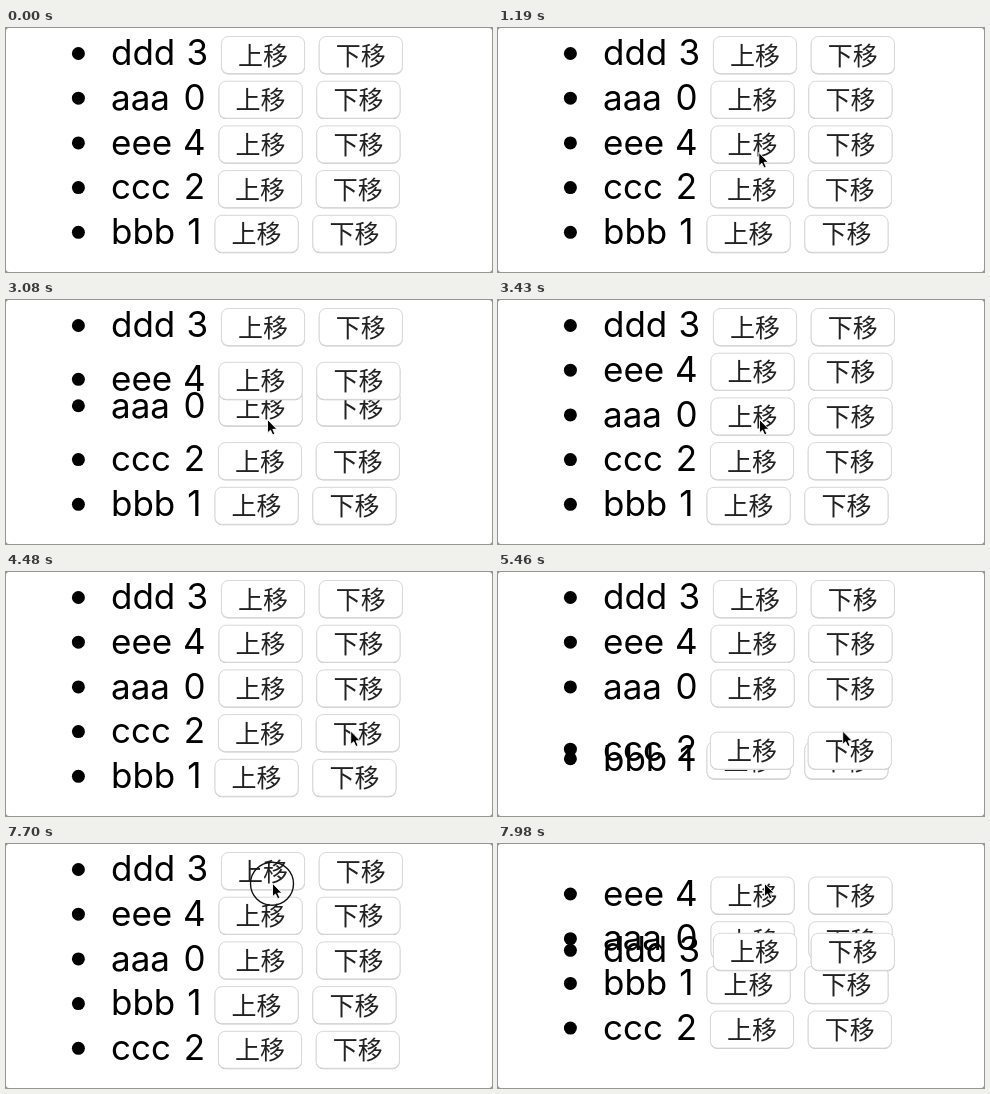
An HTML page that plays this animation: 486 px wide and 244 px high, repeating every 8 s.

```html
<!DOCTYPE html>
<html lang="zh-CN">
<head>
<meta charset="utf-8">
<title>List reorder</title>
<style>
  html, body { margin: 0; width: 100%; height: 100%; overflow: hidden; background: #fff; }
  svg { display: block; width: 100vw; height: 100vh; }
  .label { font: 35px Inter, "Helvetica Neue", sans-serif; fill: #000; }
  .caption { font: 25px "Noto Sans CJK SC", "Noto Sans CJK JP", "Noto Sans CJK", sans-serif; fill: #222; text-anchor: middle; }
  .digit { text-anchor: end; }
</style>
</head>
<body>
<svg id="stage" viewBox="0 0 486 244">
  <rect width="486" height="244" fill="#888"/>
  <rect width="486" height="244" rx="3" fill="#fff"/>
  <g id="list"></g>
  <circle id="ring" r="21.5" fill="none" stroke="#111" stroke-width="1.4"/>
  <path id="cursor" d="M0 0V13.4L3 10.7L5.2 15.5L7.4 14.5L5.3 9.8H9.5Z" fill="#000" stroke="#fff" stroke-width=".9"/>
</svg>
<script>
const LOOP = 8000, STEP = 70, PITCH = 44.7, MOVE_MS = 700;
const $ = id => document.getElementById(id);
const list = $('list'), ring = $('ring'), cursor = $('cursor');

// Row key, digit, and x of the first button
const items = [['d', 3, 215], ['a', 0, 212.6], ['e', 4, 212.6], ['c', 2, 212], ['b', 1, 208.6]];

// Row order from each start time on; the clicked row is drawn on top
const orders = [
  { start: -MOVE_MS, order: 'daecb', top: 'd' },
  { start: 2735, order: 'deacb', top: 'e' },
  { start: 5290, order: 'deabc', top: 'c' },
  { start: 7791, order: 'eabcd', top: 'd' },
];

const pointerMoves = [
  { start: 630, end: 1330, from: [245, 244], to: [261.5, 119.5], ease: u => 1 - (1 - u) ** 2 },
  { start: 3990, end: 4480, from: [261.5, 119.5], to: [344.7, 159], ease: smooth },
  { start: 6790, end: 7420, from: [344.7, 159], to: [266.5, 39.3], ease: smooth },
];

const clicks = [[2520, 2730], [5320, 5390], [7700, 7790]];

function smooth(u) { return u * u * (3 - 2 * u); }
const clamp = u => Math.min(1, Math.max(0, u));
const lerp = (a, b, u) => a + (b - a) * u;

// CSS "ease": cubic-bezier(.25, .1, .25, 1)
function cssEase(x) {
  let lo = 0, hi = 1;
  const bezier = (p1, p2, s) => 3 * p1 * s * (1 - s) ** 2 + 3 * p2 * s * s * (1 - s) + s ** 3;
  for (let i = 0; i < 24; i++) {
    const mid = (lo + hi) / 2;
    if (bezier(.25, .25, mid) < x) lo = mid; else hi = mid;
  }
  return x >= 1 ? 1 : bezier(.1, 1, lo);
}

const button = (x, caption) => `
  <rect x="${x}" y="9.2" width="84" height="37.2" rx="7.5" fill="#c4c4c4"/>
  <rect x="${x + .4}" y="8.5" width="83.2" height="37" rx="7" fill="#fff" stroke="#d8d8d8"/>
  <text class="caption" x="${x + 42}" y="36.5">${caption}</text>`;

const rows = {};
for (const [key, digit, x] of items) {
  const row = document.createElementNS('http://www.w3.org/2000/svg', 'g');
  row.innerHTML = `
    <circle cx="72.4" cy="25.5" r="6.5"/>
    <text class="label" x="105" y="37.3">${key.repeat(3)}</text>
    <text class="label digit" x="${x - 13}" y="37.3">${digit}</text>
    ${button(x, '上移')}${button(x + 97.8, '下移')}`;
  rows[key] = list.appendChild(row);
}

function drawRows(t) {
  const index = orders.findLastIndex(o => t >= o.start);
  const now = orders[index], before = orders[Math.max(0, index - 1)];
  const progress = cssEase(clamp((t - now.start) / MOVE_MS));
  for (const key in rows) {
    const slot = lerp(before.order.indexOf(key), now.order.indexOf(key), progress);
    rows[key].setAttribute('transform', `translate(0 ${slot * PITCH})`);
  }
  if (list.lastChild !== rows[now.top]) list.append(rows[now.top]);
}

function drawPointer(t) {
  const move = pointerMoves.findLast(m => t >= m.start) || pointerMoves[0];
  const u = move.ease(clamp((t - move.start) / (move.end - move.start)));
  const [x, y] = move.from.map((v, i) => lerp(v, move.to[i], u));
  cursor.setAttribute('transform', `translate(${x} ${y})`);
  cursor.style.display = t >= 700 ? '' : 'none';
  ring.setAttribute('transform', `translate(${x - .5} ${y + .5})`);
  ring.style.display = clicks.some(([a, b]) => t >= a && t < b) ? '' : 'none';
}

const origin = performance.now();
function frame() {
  const elapsed = (performance.now() - origin) % LOOP;
  const t = Math.floor(elapsed / STEP) * STEP;
  drawRows(t);
  drawPointer(t);
  requestAnimationFrame(frame);
}
frame();
</script>
</body>
</html>
```
